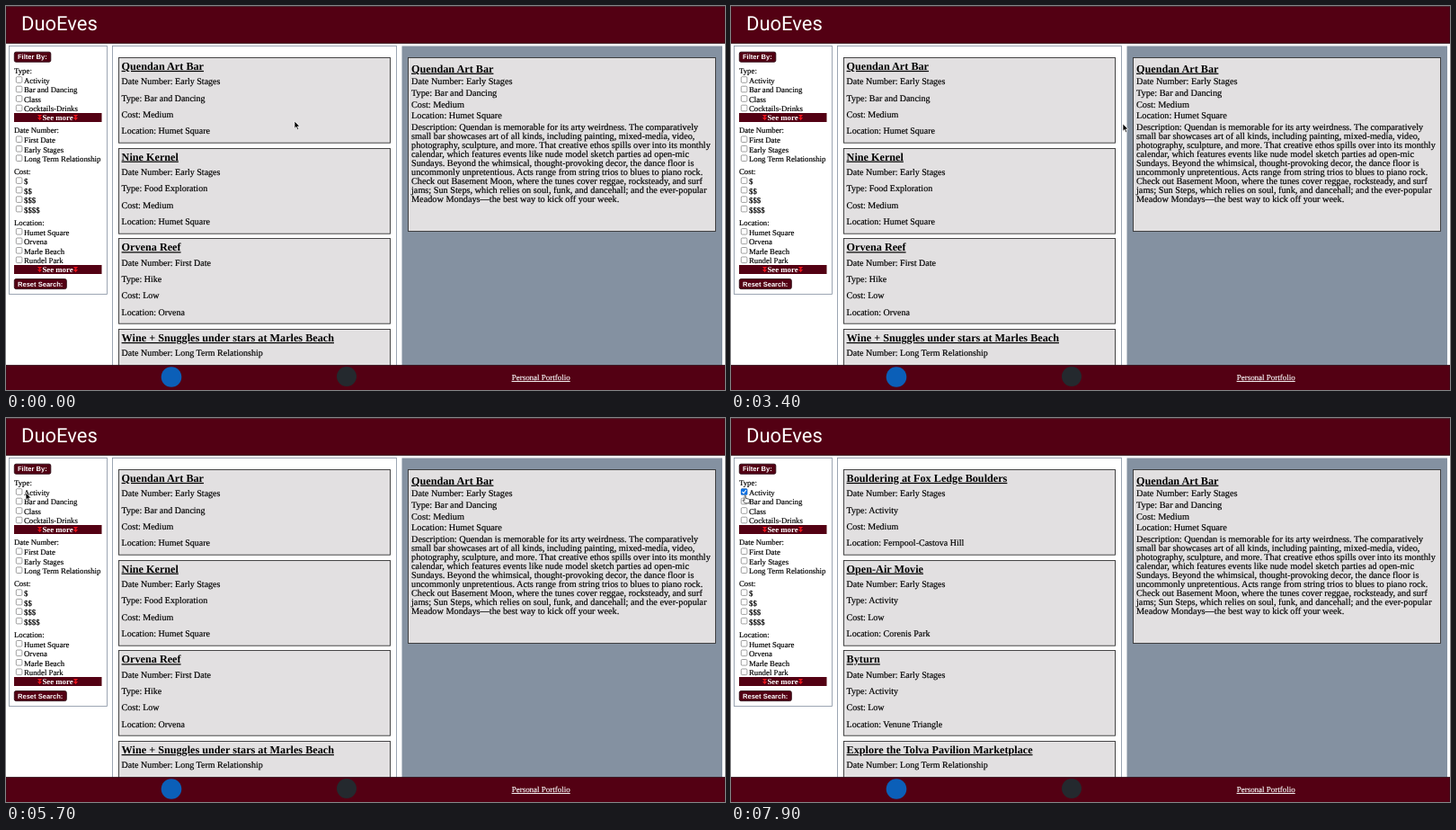
Recreate the animation shown at these times as an HTML page. Size 800 by 427 pixels, loop 8000 ms.

```html
<!DOCTYPE html>
<html lang="en">
<head>
<meta charset="utf-8">
<title>Date ideas</title>
<style>
  html, body { margin: 0; width: 100%; height: 100%; overflow: hidden; background: #fff; }
  svg { display: block; width: 100%; height: 100%; }
  text { font-family: "Liberation Serif", Times, serif; text-rendering: geometricPrecision; white-space: pre; }
  .title { font: 22px Roboto, sans-serif; fill: #fff; }
  .head { font-size: 12.2px; font-weight: bold; text-decoration: underline; }
  .row { font-size: 10.03px; }
  .detail { font-size: 10.25px; }
  .filter { font-size: 8.78px; }
  .row, .detail, .filter { stroke: #000; stroke-width: 0.18px; }
  .more { font-size: 8.78px; font-weight: bold; fill: #fff; text-anchor: middle; }
  .button { font: bold 7.55px "Liberation Sans", Arial, sans-serif; fill: #fff; }
  .link { font-size: 8.97px; fill: #fff; stroke: #fff; stroke-width: 0.15px; text-decoration: underline; }
</style>
</head>
<body>
<svg id="stage" viewBox="0 0 800 427" preserveAspectRatio="none"></svg>
<script>
const LOOP = 8000, STEP = 100;
const CHECK_AT = 6000, FILTER_AT = 6600;
const WINE = "#530013", SLATE = "#8491a1", CARD = "#e2e0e1";
const CARD_EDGE = { stroke: "#333", "stroke-width": 0.9 };
const BAR_EDGE = { stroke: "#32101a", "stroke-width": 0.8 };
const stage = document.getElementById("stage");

function add(parent, tag, attrs, content) {
  const el = document.createElementNS("http://www.w3.org/2000/svg", tag);
  for (const key in attrs) el.setAttribute(key, attrs[key]);
  if (content) el.textContent = content;
  parent.appendChild(el);
  return el;
}
const box = (parent, x, y, width, height, fill, more) =>
  add(parent, "rect", { x, y, width, height, fill, ...more });
const write = (parent, cls, x, y, content) =>
  add(parent, "text", { class: cls, x, y }, content);
const show = (el, on) => el.setAttribute("visibility", on ? "visible" : "hidden");

// Panels
box(stage, 3.5, 44.5, 109, 276, "#fff", { stroke: SLATE, "stroke-width": 0.8 });
box(stage, 118.5, 44.5, 316, 380, "#fff", { stroke: SLATE, "stroke-width": 0.8 });
box(stage, 440.5, 44.5, 356.5, 380, SLATE);

// Result cards
const allDates = [
  ["Quendan Art Bar", "Early Stages", "Bar and Dancing", "Medium", "Humet Square"],
  ["Nine Kernel", "Early Stages", "Food Exploration", "Medium", "Humet Square"],
  ["Orvena Reef", "First Date", "Hike", "Low", "Orvena"],
  ["Wine + Snuggles under stars at Marles Beach", "Long Term Relationship", "Activity", "Low", "Marle Beach"]
];
const activities = [
  ["Bouldering at Fox Ledge Boulders", "Early Stages", "Activity", "Medium", "Fernpool-Castova Hill"],
  ["Open-Air Movie", "Early Stages", "Activity", "Low", "Corenis Park"],
  ["Byturn", "Early Stages", "Activity", "Low", "Venune Triangle"],
  ["Explore the Tolva Pavilion Marketplace", "Long Term Relationship", "Activity", "Low", "Tolva Pavilion"]
];
const labels = ["Date Number: ", "Type: ", "Cost: ", "Location: "];

function cardList(items) {
  const group = add(stage, "g", {});
  items.forEach(([name, ...values], i) => {
    const y = 57.5 + i * 100.7;
    box(group, 125.5, Math.floor(y) + 0.5, 302, 94.7, CARD, CARD_EDGE);
    write(group, "head", 128.6, y + 13.4, name);
    values.forEach((value, k) => write(group, "row", 128.6, y + 29.6 + k * 18.4, labels[k] + value));
  });
  return group;
}
const fullList = cardList(allDates);
const shortList = cardList(activities);

// Detail card
box(stage, 447.5, 57.5, 342, 193, CARD, CARD_EDGE);
write(stage, "head", 451, 73.7, allDates[0][0]);
allDates[0].slice(1).forEach((value, k) => write(stage, "detail", 451, 87.2 + k * 12.7, labels[k] + value));
[
  "Description: Quendan is memorable for its arty weirdness. The comparatively",
  "small bar showcases art of all kinds, including painting, mixed-media, video,",
  "photography, sculpture, and more. That creative ethos spills over into its monthly",
  "calendar, which features events like nude model sketch parties ad open-mic",
  "Sundays. Beyond the whimsical, thought-provoking decor, the dance floor is",
  "uncommonly unpretentious. Acts range from string trios to blues to piano rock.",
  "Check out Basement Moon, where the tunes cover reggae, rocksteady, and surf",
  "jams; Sun Steps, which relies on soul, funk, and dancehall; and the ever-popular",
  "Meadow Mondays\u2014the best way to kick off your week."
].forEach((line, k) => write(stage, "detail", 451, 137.8 + k * 10.07, line));

// Filters
function button(y, width, label) {
  box(stage, 9.3, y, width, 11, WINE, { rx: 1.8, stroke: "#2b0a12", "stroke-width": 0.9 });
  write(stage, "button", 13, y + 8.1, label);
}
function seeMore(y) {
  box(stage, 9, y, 97.5, 10, WINE);
  write(stage, "more", 57.5, y + 7.9, "See more");
  for (const x of [35, 75])
    add(stage, "path", { d: `M${x} ${y + 2}h5l-2.5 3.2zM${x} ${y + 5}h5l-2.5 3.2z`, fill: "#e8141c" });
}
function checkbox(y) {
  box(stage, 11.3, y - 7.2, 6.6, 6.6, "#fff", { rx: 1.2, stroke: "#767676", "stroke-width": 0.7 });
}
button(51.2, 40.5, "Filter By:");
button(303.6, 58, "Reset Search:");
[
  [75.2, "Type:", "Activity", "Bar and Dancing", "Class", "Cocktails-Drinks"],
  [141.4, "Date Number:", "First Date", "Early Stages", "Long Term Relationship"],
  [187.3, "Cost:", "$", "$$", "$$$", "$$$$"],
  [244, "Location:", "Humet Square", "Orvena", "Marle Beach", "Rundel Park"]
].forEach(([y, name, ...options]) => {
  write(stage, "filter", 9, y, name);
  options.forEach((option, k) => {
    const base = y + 10.7 + k * 10.5;
    checkbox(base);
    write(stage, "filter", 20, base, option);
  });
});
seeMore(119);
seeMore(288);

const tick = add(stage, "g", {});
box(tick, 11, 78.4, 7.2, 7.2, "#0b6fe0", { rx: 1.2 });
add(tick, "path", { d: "M12.5 82l1.6 1.7 2.7-3.7", fill: "none", stroke: "#fff", "stroke-width": 1.1 });

// Header and footer
box(stage, 0, 0.5, 800, 41, WINE, BAR_EDGE);
write(stage, "title", 17, 27, "DuoEves");
box(stage, 0, 399.5, 800, 28, WINE, BAR_EDGE);
add(stage, "circle", { cx: 184, cy: 412.5, r: 11.3, fill: "#0b5fb8" });
add(stage, "circle", { cx: 379, cy: 412, r: 11, fill: "#24292e" });
write(stage, "link", 562.7, 416, "Personal Portfolio");

// Pointer
const pointer = add(stage, "g", {});
const arrow = add(pointer, "path", {
  d: "M0 0v8.2l1.9-1.8 1.3 3 1.4-.6-1.3-2.9h2.6z",
  fill: "#000", stroke: "#fff", "stroke-width": 0.7
});
const hand = add(pointer, "path", {
  d: "M0 .8q.9-1.2 1.6 0v2.6l3.3.8q.9.3.8 1.3l-.7 3.3H.6l-2.4-3q-.1-1.2 1-.7l.8.7z",
  fill: "#fff", stroke: "#000", "stroke-width": 0.6
});

// Time, x, y
const path = [
  [0, 321, 128], [300, 325, 125], [800, 452, 72], [1300, 623, 53], [1800, 782, 54],
  [2000, 791, 90], [2400, 790, 250], [2800, 610, 257], [3100, 446, 250],
  [3400, 436, 131], [3800, 434, 54], [4200, 390, 34], [4700, 268, 27],
  [5100, 112, 44], [5400, 8, 72], [5700, 22, 83], [5900, 14, 81], [6100, 14, 81],
  [6500, 38, 53], [7200, 38, 53], [7500, 24, 70], [7900, 15, 86], [8000, 15, 86]
];
function pointAt(t) {
  const i = path.findIndex(p => p[0] > t);
  const [t0, x0, y0] = path[i - 1], [t1, x1, y1] = path[i];
  const k = (t - t0) / (t1 - t0);
  return [x0 + (x1 - x0) * k, y0 + (y1 - y0) * k];
}

function draw(now) {
  const t = Math.floor((now % LOOP) / STEP) * STEP;
  const [x, y] = pointAt(t);
  const isHand = (t >= 6400 && t <= 7200) || t >= 7700;
  pointer.setAttribute("transform", `translate(${x} ${y})`);
  show(arrow, !isHand);
  show(hand, isHand);
  show(tick, t >= CHECK_AT);
  show(fullList, t < FILTER_AT);
  show(shortList, t >= FILTER_AT);
}
const start = performance.now();
function loop() {
  draw(performance.now() - start);
  requestAnimationFrame(loop);
}
loop();
</script>
</body>
</html>
```
